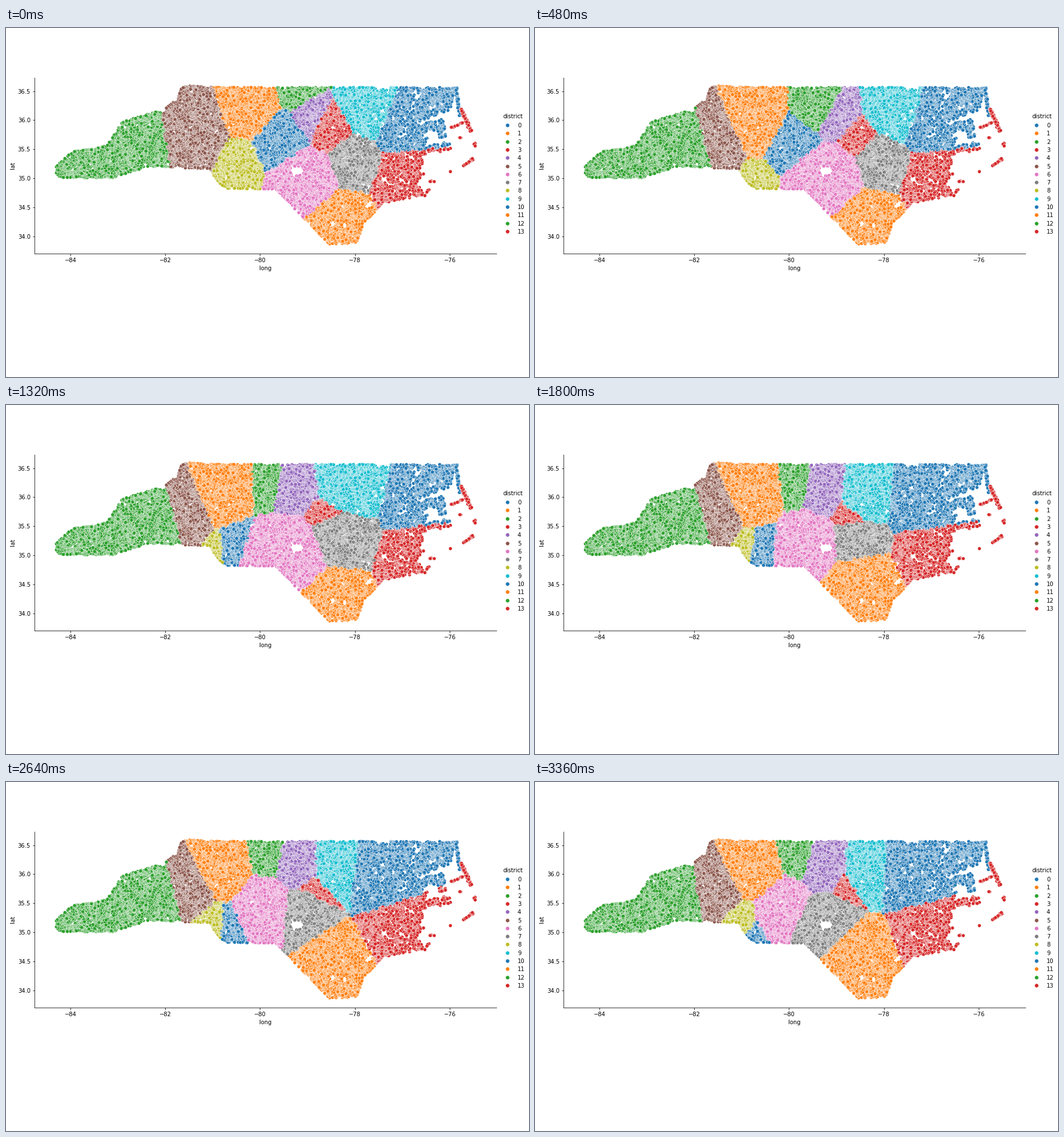
A matplotlib script for the animation above (3480 ms loop, 917 by 611 pixels).

```python
import matplotlib.pyplot as plt
import numpy as np
from matplotlib import colormaps
from matplotlib.animation import FuncAnimation
from matplotlib.path import Path

W, H, DPI = 917, 611, 72
FRAMES, STEP = 29, 120
BOX = (84, 98), (795, 382)
CELL = 3
N = 14
PALETTE = np.array(colormaps["tab10"].colors)[np.arange(N) % 10]
rng = np.random.default_rng(11)

COAST = np.reshape([
    88, 262, 88, 240, 118, 216, 158, 211, 178, 205, 203, 165, 245, 152, 264, 146,
    279, 150, 281, 140, 302, 122, 309, 101, 375, 104, 789, 104, 779, 143, 708, 172,
    768, 159, 771, 190, 738, 196, 735, 207, 782, 198, 780, 212, 731, 224, 733, 262,
    722, 272, 735, 291, 662, 308, 628, 340, 614, 377, 567, 378, 521, 332, 473, 282,
    380, 281, 357, 247, 250, 242, 188, 262], (-1, 2))
PONDS = [(510, 250, 12, 8), (745, 186, 12, 7), (637, 309, 6, 6),
         (573, 344, 5, 5), (594, 347, 5, 5), (663, 265, 6, 6)]


def on_land(p):
    keep = Path(COAST).contains_points(p)
    for cx, cy, rx, ry in PONDS:
        keep &= ((p - (cx, cy)) ** 2 / (rx ** 2, ry ** 2)).sum(axis=1) > 1
    return p[keep]


def thin(p):
    """Fewer dots towards the coast in the east."""
    return p[rng.random(len(p)) < np.interp(p[:, 0], [600, 700], [1, .6])]


def blocks(count):
    """Dots stacked block by block, each block swept in its own direction."""
    p = thin(on_land(rng.uniform(*BOX, (count, 2))))
    seeds = rng.uniform(*BOX, (450, 2))
    block = ((p[:, None] - seeds) ** 2).sum(axis=2).argmin(axis=1)
    angle = rng.uniform(0, 2 * np.pi, len(seeds))[block]
    sweep = p[:, 0] * np.cos(angle) + p[:, 1] * np.sin(angle)
    return p[np.lexsort((sweep, block))]


def streets(count, length=10, step=.9):
    """Short rows of overlapping dots."""
    start = thin(on_land(rng.uniform(*BOX, (count, 2))))
    angle = rng.uniform(0, 2 * np.pi, len(start))
    heading = np.column_stack([np.cos(angle), np.sin(angle)])
    walk = step * np.arange(length)[:, None]
    rows = start[:, None] + heading[:, None] * walk
    return on_land(rows.reshape(-1, 2) + rng.normal(0, .3, (rows.size // 2, 2)))


def isle(x0, y0, x1, y1, count):
    t = rng.random((count, 1))
    return np.array([x0, y0]) + t * [x1 - x0, y1 - y0] + rng.normal(0, .8, (count, 2))


land = np.vstack([blocks(26000), streets(1900)])
north_bank = isle(789, 106, 796, 153, 70)
banks = np.vstack([
    isle(798, 142, 815, 180, 70), isle(781, 175, 800, 166, 12),
    isle(742, 269, 753, 267, 6), isle(735, 293, 742, 282, 6),
    isle(803, 241, 820, 228, 18), isle(822, 201, 823, 208, 3),
    isle(780, 251, 780, 251, 1), isle(797, 191, 797, 191, 2)])

tracks = {}


def track(name, *keys):
    """Keys are (frame, centre x, centre y, area in hundreds of square pixels)."""
    tracks[name] = np.array(keys, float).T


track(0, (0, 477, 197, 62), (4, 450, 200, 59), (8, 410, 227, 46),
      (12, 406, 240, 31), (22, 399, 247, 23), (28, 386, 261, 9))
track(1, (0, 421, 145, 80), (4, 386, 153, 107), (8, 380, 147, 87),
      (12, 387, 154, 105), (22, 379, 148, 86))
track(2, (0, 508, 120, 22), (4, 487, 136, 48), (8, 470, 145, 71),
      (11, 460, 145, 37), (22, 455, 132, 31))
track(3, (0, 566, 175, 39), (4, 563, 190, 28), (15, 548, 190, 14), (28, 547, 187, 16))
track(4, (0, 534, 152, 32), (8, 526, 155, 57), (11, 511, 150, 58),
      (22, 512, 143, 47), (28, 509, 148, 55))
track(5, (0, 328, 179, 133), (4, 322, 184, 73), (25, 319, 181, 66), (28, 314, 184, 74))
track(6, (0, 518, 264, 96), (11, 491, 252, 130), (15, 477, 238, 100),
      (22, 449, 221, 93), (28, 432, 219, 80))
track(7, (0, 608, 234, 71), (8, 606, 240, 76), (11, 595, 235, 98),
      (15, 574, 235, 60), (22, 526, 234, 72), (28, 509, 245, 85))
track(8, (0, 408, 238, 63), (4, 394, 253, 29), (8, 372, 246, 8),
      (15, 373, 237, 12), (22, 360, 235, 17), (28, 361, 231, 20))
track(9, (0, 629, 140, 69), (8, 620, 146, 85), (11, 606, 144, 100),
      (15, 585, 151, 78), (22, 580, 150, 65), (28, 580, 156, 70))
track(10, (0, 712, 160, 110), (11, 709, 160, 114), (15, 692, 158, 158), (22, 682, 157, 164))
track(11, (0, 585, 331, 78), (11, 581, 327, 87), (15, 580, 314, 118), (28, 574, 305, 133))
track(12, (0, 202, 213, 132), (4, 211, 213, 147), (25, 211, 213, 147), (28, 204, 212, 136))
track(13, (0, 695, 260, 75), (11, 695, 259, 75), (15, 688, 255, 92),
      (22, 690, 246, 105), (28, 686, 252, 102))

grid = on_land(np.stack(np.meshgrid(np.arange(84, 796, CELL),
                                    np.arange(98, 383, CELL)), -1).reshape(-1, 2))


def goals(frame):
    g = np.array([[np.interp(frame, tracks[k][0], v) for v in tracks[k][1:]]
                  for k in range(N)])
    return g[:, :2], g[:, 2] / g[:, 2].sum() * len(grid) * CELL ** 2


def nearest(p, sites, weight):
    """Cells of a power diagram."""
    return ((sites ** 2).sum(axis=1) - weight - 2 * p @ sites.T).argmin(axis=1)


def owners():
    """Adjust sites and weights until each district has its centre and area."""
    shift, weight, result = np.zeros((N, 2)), np.zeros(N), []
    for frame in range(FRAMES):
        centre, area = goals(frame)
        for _ in range(40 if frame else 300):
            own = nearest(grid, centre + shift, weight)
            size = np.bincount(own, minlength=N)
            mean = np.column_stack([np.bincount(own, v, N) for v in grid.T])
            mean /= np.maximum(size, 1)[:, None]
            miss = np.where(size[:, None] > 0, centre - mean, 0)
            shift = np.clip(.9 * shift + .3 * miss, -30, 30)
            weight += .25 * (area - size * CELL ** 2)
        result.append(np.concatenate([nearest(land, centre + shift, weight),
                                      np.full(len(north_bank), 10),
                                      np.full(len(banks), 13)]))
    return result


district = owners()

fig = plt.figure(figsize=(W / DPI, H / DPI), dpi=DPI, facecolor="white")

ax = fig.add_axes([50 / W, 216 / H, 810 / W, 308 / H])
ax.set(xlim=(-84.758, -75.013), ylim=(33.7055, 36.731), xlabel="long", ylabel="lat",
       xticks=np.arange(-84, -75, 2), yticks=np.arange(34, 37, .5))
ax.spines[["top", "right"]].set_visible(False)

stage = fig.add_axes([0, 0, 1, 1])
stage.set(xlim=(0, W), ylim=(H, 0))
stage.axis("off")
dots = stage.scatter(*np.vstack([land, north_bank, banks]).T, s=38, marker=(12, 0, 0),
                     c=PALETTE[district[0]], edgecolors="white", linewidths=.48)

stage.text(889, 155, "district", ha="center", va="center")
for i, color in enumerate(PALETTE):
    y = 170 + 14.3 * i
    stage.scatter(879, y, s=36, color=[color], linewidths=.3)
    stage.text(897, y, str(i), va="center_baseline")


def draw(frame):
    dots.set_facecolor(PALETTE[district[frame]])
    return [dots]


anim = FuncAnimation(fig, draw, frames=FRAMES, interval=STEP, repeat=True)
plt.show()
```
